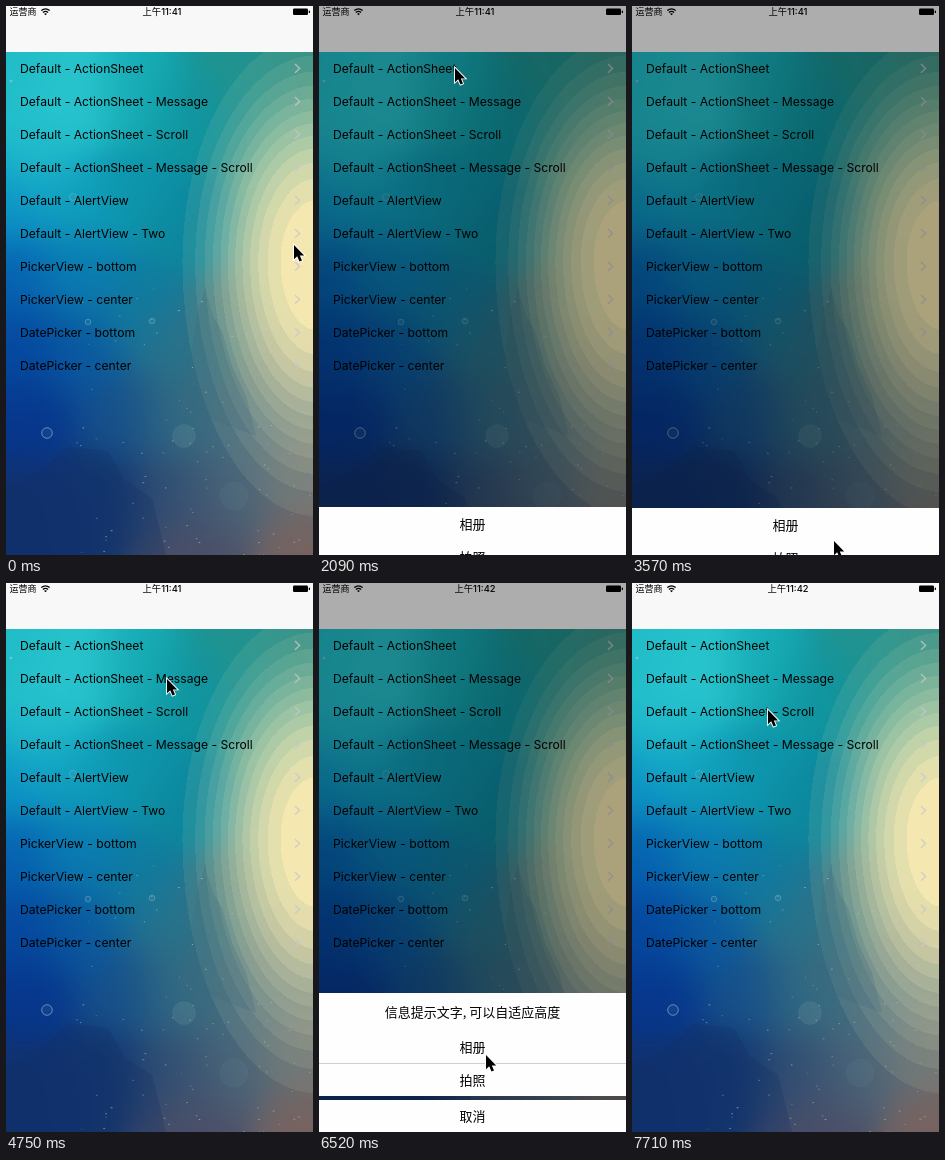
An HTML page with a canvas that plays this animation: 307x549 px, repeating every 8000 ms.

```html
<!DOCTYPE html>
<html lang="zh-CN">
<head>
<meta charset="utf-8">
<title>Action sheets</title>
<style>
  html, body { margin: 0; width: 100%; height: 100%; overflow: hidden; }
  #stage { position: relative; width: 307px; height: 549px; overflow: hidden; color: #000;
    font: 13px 'Noto Sans CJK SC', 'Noto Sans CJK', sans-serif; }
  #stage > *, .status span { position: absolute; }
  canvas, .dim { left: 0; top: 0; }
  .bar { left: 0; top: 0; width: 307px; height: 46px; background: #f8f8f8; }
  .status { left: 0; top: 0; width: 307px; height: 12px; font-size: 9px; line-height: 12px; white-space: nowrap; }
  .carrier { left: 3.5px; }
  #clock { left: 116px; width: 80px; text-align: center; font: 500 9.3px/12px Inter, 'Noto Sans CJK SC', sans-serif; }
  #list { left: 14px; top: 46px; font: 12.15px/33px Inter, sans-serif; white-space: nowrap; }
  svg { left: 0; top: 0; overflow: visible; }
  .dim { width: 307px; height: 549px; background: rgba(0, 0, 0, .3); }
  #sheet { left: 0; width: 307px; text-align: center; }
  #sheet div { height: 33px; line-height: 33px; background: #fefefe; box-sizing: border-box; }
  #sheet #message { height: 37px; line-height: 38px; }
  #sheet .album { height: 34px; border-bottom: 1px solid #cfcfcf; }
  #sheet.moving .album { border-color: #fefefe; }
  #sheet .cancel { height: 32px; line-height: 32px; margin-top: 4px; }
  #sheet .photo { height: 32px; line-height: 32px; }
</style>
</head>
<body>
<div id="stage">
  <canvas id="wallpaper" width="307" height="549"></canvas>
  <div class="bar"></div>
  <div id="list"></div>
  <svg id="chevrons" width="307" height="549" fill="none" stroke="#c7c7cc" stroke-opacity=".8" stroke-width="1.4"></svg>
  <div class="dim" id="dim"></div>
  <div class="status">
    <span class="carrier">运营商</span>
    <span id="clock"></span>
  </div>
  <svg width="307" height="12">
    <g fill="none" stroke="#000" stroke-width="1.3">
      <path d="M35.3 4.6Q39.5 1 43.7 4.6M36.9 6.5Q39.5 4.2 42.1 6.5"/>
    </g>
    <path d="M38 7.7Q39.5 6.6 41 7.7L39.5 9.3Z"/>
    <rect x="287" y="2.5" width="15" height="6.5" rx="1.2"/>
    <rect x="302.8" y="4.6" width="1.2" height="2.4" rx=".6"/>
  </svg>
  <div id="sheet">
    <div id="message">信息提示文字, 可以自适应高度</div>
    <div class="album">相册</div>
    <div class="photo">拍照</div>
    <div class="cancel">取消</div>
  </div>
  <svg id="cursor" width="14" height="20">
    <path d="M0 0V14.2L3.2 11.3 5.5 16.6 8 15.5 5.8 10.4H10.2Z" stroke="#fff" stroke-width="1.8" paint-order="stroke"/>
  </svg>
</div>
<script>
const WIDTH = 307, HEIGHT = 549, LOOP = 8000, STEP = 148.1;
const $ = id => document.getElementById(id);

const rows = ['Default - ActionSheet', 'Default - ActionSheet - Message', 'Default - ActionSheet - Scroll',
  'Default - ActionSheet - Message - Scroll', 'Default - AlertView', 'Default - AlertView - Two',
  'PickerView - bottom', 'PickerView - center', 'DatePicker - bottom', 'DatePicker - center'];
$('list').innerHTML = rows.map(name => `<div>${name}</div>`).join('');
$('chevrons').innerHTML = rows.map((_, i) => `<path d="M289 ${58 + 33 * i}l4.6 4.4l-4.6 4.4"/>`).join('');

// Main tones of the wallpaper without its warm glow, blended by distance.
const tones = [
  [10, 60, '20bdc8'], [65, 90, '2ac6cf'], [30, 145, '20bdcc'], [130, 90, '17adb6'], [185, 110, '0e939f'],
  [235, 70, '21938f'], [300, 60, '2a8b84'], [265, 140, '1f8f92'], [0, 200, '0c94c6'], [65, 195, '10a0be'],
  [125, 190, '0d95ac'], [180, 220, '0c879c'], [290, 250, '2a8a92'], [5, 270, '0560b0'], [70, 265, '0a7cb2'],
  [130, 300, '0e7ba0'], [15, 345, '0448a0'], [75, 345, '0a5aa0'], [165, 340, '2a7188'], [225, 320, '35727f'],
  [290, 370, '365f75'], [25, 410, '06368c'], [115, 410, '16508a'], [175, 410, '356b80'], [240, 420, '456c7f'],
  [20, 500, '10316f'], [95, 490, '113470'], [165, 490, '2f4d72'], [220, 490, '4a6478'], [290, 470, '646f74'],
  [190, 545, '4c4d66'], [300, 545, '776360']
].map(([x, y, hex]) => ({ x, y, rgb: [0, 2, 4].map(i => parseInt(hex.slice(i, i + 2), 16)) }));
const GLOW = [244, 232, 176];

// Strength of the warm light at the right edge, in flat elliptical bands.
function glowAt(x, y) {
  const distance = Math.hypot(x - 310, (y - 255) / (y < 255 ? 1.7 : 1.9));
  const p = Math.min(1, Math.max(0, (distance - 20) / 130));
  return Math.round((1 - p * p * (3 - 2 * p)) * 12) / 12;
}

function paintWallpaper() {
  const ctx = $('wallpaper').getContext('2d');
  const image = ctx.createImageData(WIDTH, HEIGHT);
  for (let y = 46, p = 46 * WIDTH * 4; y < HEIGHT; y++) {
    for (let x = 0; x < WIDTH; x++, p += 4) {
      let r = 0, g = 0, b = 0, total = 0;
      for (const tone of tones) {
        const w = Math.exp(-((x - tone.x) ** 2 + (y - tone.y) ** 2) / 1800);
        r += w * tone.rgb[0];
        g += w * tone.rgb[1];
        b += w * tone.rgb[2];
        total += w;
      }
      const glow = glowAt(x, y);
      [r, g, b].forEach((value, i) => {
        image.data[p + i] = value / total * (1 - glow) + GLOW[i] * glow;
      });
      image.data[p + 3] = 255;
    }
  }
  ctx.putImageData(image, 0, 0);

  const shape = (path, color) => {
    ctx.fillStyle = color;
    ctx.fill(new Path2D(path));
  };
  shape('M0 482L38 462 62 441 102 445 118 474 146 492 160 549H0Z', 'rgba(18,44,98,.25)');
  shape('M170 400L186 345 192 305 199 283 207 310 216 325 226 360 240 390 250 430Z', 'rgba(60,105,125,.25)');

  let seed = 11;
  const random = () => (seed = seed * 16807 % 2147483647) / 2147483647;
  for (let i = 0; i < 90; i++) {
    ctx.fillStyle = `rgba(190,215,215,${0.2 + random() * 0.4})`;
    ctx.fillRect(70 + random() * 235, 549 - 270 * random() ** 1.3, 1 + random(), 1);
  }

  const bubble = (x, y, radius, stroke, fill) => {
    ctx.beginPath();
    ctx.arc(x, y, radius, 0, 7);
    ctx.strokeStyle = `rgba(190,215,220,${stroke})`;
    ctx.fillStyle = `rgba(150,185,180,${fill})`;
    ctx.fill();
    ctx.stroke();
  };
  bubble(41, 427, 5.3, .5, .08);
  bubble(67, 191, 3.5, .25, .05);
  bubble(82, 316, 2.8, .3, .1);
  bubble(146, 315, 2.8, .3, .1);
  bubble(178, 430, 11.5, .04, .14);
  bubble(228, 490, 14, .02, .06);
  bubble(5, 75, 1, .4, .4);
}

// Keys are [step, ...values].
const cursorKeys = [[0, 288, 239], [4, 288, 239], [9, 136, 62], [16, 136, 62], [22, 202, 535], [24, 202, 535],
  [29, 161, 100], [30, 161, 96], [35, 161, 96], [41, 167, 472], [47, 167, 472], [52, 136, 127], [60, 136, 127]];
const liftKeys = [[0, 0], [13, 0], [14, 48], [15, 102], [23, 102], [24, 47], [25, 0],
  [33, 0], [34, 60], [35, 139], [45, 139], [46, 60], [47, 0], [60, 0]];

function track(keys, step) {
  const next = keys.findIndex(key => key[0] > step);
  const [start, ...from] = keys[next - 1];
  const [end, ...to] = keys[next];
  const p = (step - start) / (end - start);
  const eased = p * p * (3 - 2 * p);
  return from.map((value, i) => value + (to[i] - value) * eased);
}

function render() {
  const step = Math.floor(performance.now() % LOOP / STEP);
  const [x, y] = track(cursorKeys, step);
  const [lift] = track(liftKeys, step);
  $('cursor').style.transform = `translate(${Math.round(x)}px, ${Math.round(y)}px)`;
  $('sheet').style.top = HEIGHT - lift + 'px';
  $('sheet').classList.toggle('moving', lift < 102);
  $('message').hidden = step < 30;
  $('dim').hidden = lift === 0;
  $('clock').textContent = step < 39 ? '上午11:41' : '上午11:42';
  requestAnimationFrame(render);
}

paintWallpaper();
render();
</script>
</body>
</html>
```
